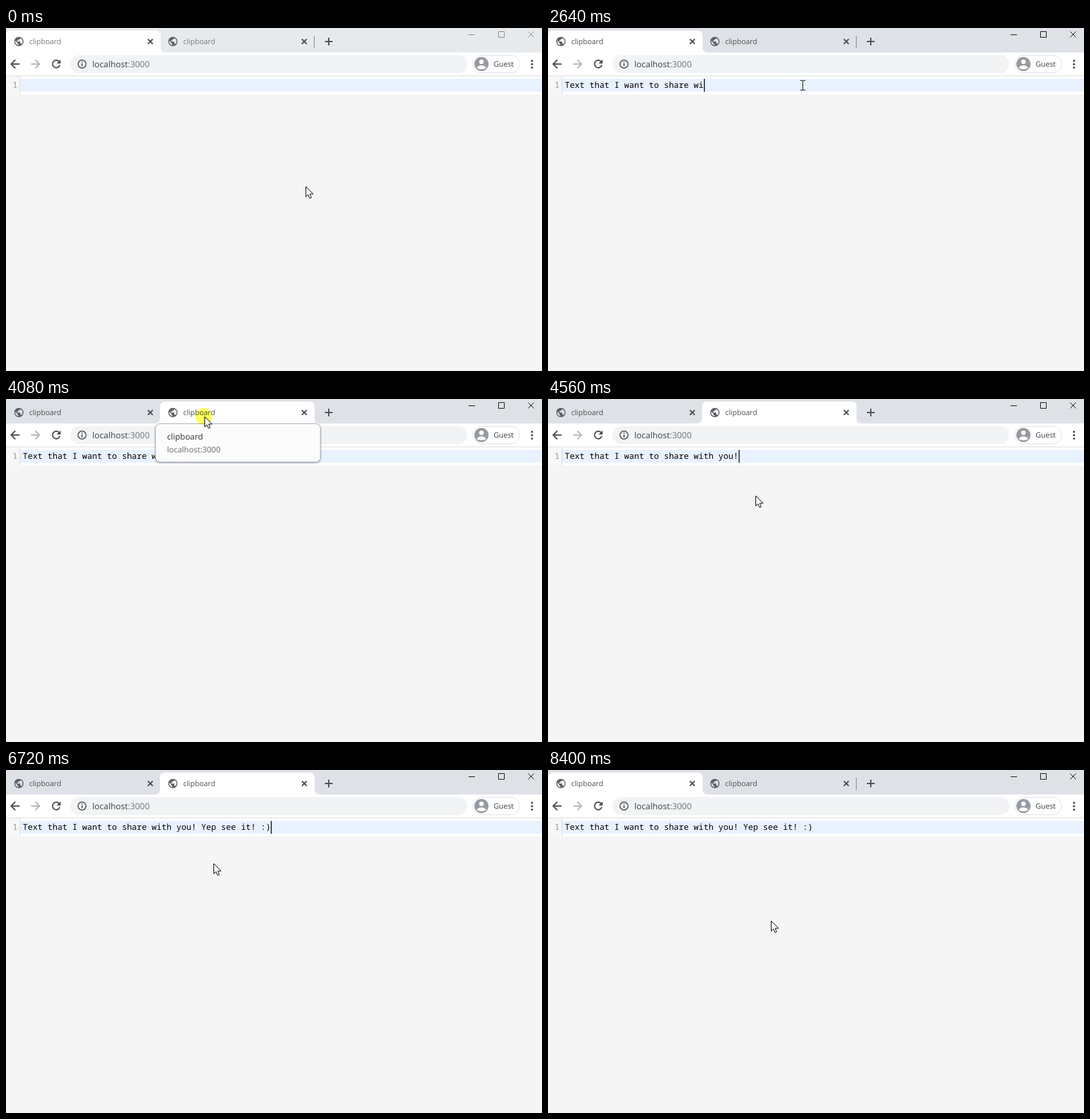
Animation, 832 px wide and 533 px high, one loop 8640 ms. Source, as an HTML page:

```html
<!DOCTYPE html>
<html lang="en">
<head>
<meta charset="utf-8">
<title>clipboard</title>
<style>
  html, body { margin: 0; width: 100%; height: 100%; overflow: hidden; background: #f5f5f5; }
  svg { display: block; width: 832px; height: 533px; }
  text { text-rendering: geometricPrecision; font-family: "Open Sans", "Noto Sans", sans-serif; white-space: pre; }
  .code { font: 12.83px "Noto Sans Mono", "DejaVu Sans Mono", monospace; }
  .title { font-size: 11.4px; fill: #4b4f53; }
  .line { fill: none; stroke: #4c5054; stroke-width: 2; }
  .inactive .title { fill: #777; }
  .inactive #buttons { stroke: #8b8b8b; }
</style>
</head>
<body>
<svg id="stage" viewBox="0 0 832 533">
  <defs>
    <path id="globe" transform="translate(11.4 12.4) scale(.72)" fill="#5f6368" d="M12 2C6.48 2 2 6.48 2 12s4.48 10 10 10 10-4.48 10-10S17.52 2 12 2zm-1 17.93c-3.95-.49-7-3.85-7-7.93 0-.62.08-1.21.21-1.79L9 15v1c0 1.1.9 2 2 2zm6.9-2.54c-.26-.81-1-1.39-1.9-1.39h-1v-3c0-.55-.45-1-1-1H8v-2h2c.55 0 1-.45 1-1V7h2c1.1 0 2-.9 2-2v-.41c2.93 1.19 5 4.06 5 7.41 0 2.08-.8 3.97-2.1 5.39z"/>
    <g id="tab">
      <use href="#globe"/>
      <text class="title" x="36" y="25">clipboard</text>
      <path class="line" stroke-width="1.8" d="M220.2 17.2l7.6 7.6m0-7.6l-7.6 7.6"/>
    </g>
    <filter id="shadow" x="-10%" y="-10%" width="120%" height="130%">
      <feDropShadow dx="0" dy="1" stdDeviation="1" flood-color="#334" flood-opacity=".55"/>
    </filter>
  </defs>

  <rect width="832" height="533" fill="#f5f5f5"/>
  <rect id="strip" width="832" height="38"/>
  <path id="activeTab" fill="#fff" d="M-8 38Q0 38 0 30V12Q0 4 8 4H232Q240 4 240 12V30Q240 38 248 38Z"/>
  <use href="#tab"/>
  <use href="#tab" x="239"/>
  <path id="divider" stroke="#808488" d="M478.5 12V31"/>
  <path class="line" d="M495 21H507M501 15V27"/>
  <path id="buttons" fill="none" stroke="#111" d="M718 10.5H728M764.5 5.5h9v9h-9ZM810.5 5.5l9 9m0-9l-9 9"/>

  <rect y="38" width="832" height="36" fill="#fff"/>
  <path class="line" d="M21 56H8.5M14.5 49.5L8 56L14.5 62.5"/>
  <path class="line" style="stroke:#b5b7ba" d="M39 56H51.5M45.5 49.5L52 56L45.5 62.5"/>
  <path class="line" d="M82.3 52A5.8 5.8 0 1 0 83.6 57.5"/>
  <path fill="#4c5054" d="M84.8 49V55.3H78.5Z"/>
  <rect x="100" y="42" width="616" height="28" rx="14" fill="#f1f3f4"/>
  <circle class="line" cx="118" cy="56" r="6.2" style="stroke-width:1.5"/>
  <path class="line" style="stroke-width:1.6" d="M118 55V59.5M118 52V53.7"/>
  <text x="134" y="61" font-size="13.2" fill="#3c4043">localhost<tspan fill="#70757a">:3000</tspan></text>
  <rect x="724.5" y="42.5" width="73" height="27" rx="13.5" fill="#fff" stroke="#dfe1e5"/>
  <circle cx="738" cy="56" r="11" fill="#969ba1"/>
  <circle cx="738" cy="52.5" r="3.5" fill="#fff"/>
  <path fill="#fff" d="M731 62.5C731 56.7 745 56.7 745 62.5Q738 66 731 62.5Z"/>
  <text x="757" y="60" font-size="11.4" fill="#3c4043">Guest</text>
  <g fill="#4c5054"><circle cx="816.5" cy="51" r="1.7"/><circle cx="816.5" cy="56.3" r="1.7"/><circle cx="816.5" cy="61.6" r="1.7"/></g>

  <rect y="74" width="832" height="1" fill="#dcdee0"/>
  <rect y="75" width="832" height="28" fill="#fff"/>
  <rect y="75" width="21" height="28" fill="#f7f7f7"/>
  <rect x="21" y="75" width="1" height="28" fill="#ddd"/>
  <rect x="22" y="79" width="810" height="20" fill="#e8f2ff"/>
  <text class="code" x="10.3" y="93" fill="#999">1</text>
  <text class="code" id="typed" x="26" y="93" fill="#000"></text>
  <rect id="caret" y="79" width="1.3" height="20"/>

  <g id="card">
    <rect x="232" y="38.5" width="256" height="59.5" rx="7" fill="#fff" fill-opacity=".95" stroke="#98a0a8" stroke-width=".8" filter="url(#shadow)"/>
    <text x="250" y="63" font-size="12.75" fill="#303336">clipboard</text>
    <text x="250" y="83" font-size="12.3" fill="#666a6e">localhost:3000</text>
  </g>

  <circle id="click" r="13" fill="#ffff60" style="mix-blend-mode:multiply"/>
  <g id="pointer">
    <path id="arrow" fill="#fff" stroke="#000" d="M.5 .5V16.3L4 13L6.5 18.6L9 17.6L6.6 12H11.8Z"/>
    <path id="beam" fill="none" stroke="#111" d="M-3.5 -7.5H-1Q.5 -7.5 .5 -6V6.5Q.5 7.5 -1 7.5H-3.5M4.5 -7.5H2Q.5 -7.5 .5 -6M.5 6Q.5 7.5 2 7.5H4.5"/>
  </g>
</svg>
<script>
const LOOP = 8640, STEP = 240, ADVANCE = 7.7;
const MESSAGE = "Text that I want to share with you! Yep see it! :)";

// Each key is [time, value...]; values run linearly between keys.
const typing = [
  [480, 0], [960, 7], [1200, 10], [2400, 24], [2640, 28], [3360, 35],
  [4560, 35], [4800, 36], [5040, 36], [5760, 44], [6240, 47], [6720, 50]
];
const travel = [
  [0, 465, 246], [480, 395, 89], [3360, 395, 89], [3600, 395, 112],
  [4080, 308, 27], [4320, 340, 89], [4560, 322, 150], [4800, 322, 145],
  [6720, 322, 145], [6960, 405, 120], [7440, 26, 108], [7680, 240, 48],
  [7920, 120, 27], [8400, 346, 234]
];
const clicks = [480, 4080, 4320, 7920];

const el = id => document.getElementById(id);
const show = (id, on) => el(id).setAttribute("visibility", on ? "visible" : "hidden");
const between = (v, low, high) => v >= low && v < high;

function sample(keys, t) {
  const next = keys.findIndex(key => key[0] > t);
  if (next === 0) return keys[0].slice(1);
  if (next < 0) return keys[keys.length - 1].slice(1);
  const from = keys[next - 1], to = keys[next];
  const k = (t - from[0]) / (to[0] - from[0]);
  return from.slice(1).map((v, i) => v + (to[i + 1] - v) * k);
}

function render(time) {
  const t = Math.floor(time % LOOP / STEP) * STEP;
  const focused = t >= 480;
  const second = between(t, 4080, 7920);

  el("stage").classList.toggle("inactive", !focused);
  el("strip").setAttribute("fill", focused ? "#dee1e6" : "#e7eaed");
  el("activeTab").setAttribute("transform", `translate(${second ? 239 : 0})`);
  show("divider", !second);
  show("card", t === 4080);

  const count = Math.round(sample(typing, t)[0]);
  el("typed").textContent = MESSAGE.slice(0, count);
  el("caret").setAttribute("x", Math.round(26 + count * ADVANCE));
  show("caret", between(t, 480, 7440) && t !== 4080);

  const [x, y] = sample(travel, t).map(Math.round);
  const overText = between(y, 42, 71) || between(y, 79, 103);
  el("pointer").setAttribute("transform", `translate(${x} ${y})`);
  show("arrow", !overText);
  show("beam", overText);
  el("click").setAttribute("cx", x - 1);
  el("click").setAttribute("cy", y);
  show("click", clicks.includes(t));
}

function tick() {
  render(performance.now());
  requestAnimationFrame(tick);
}
tick();
</script>
</body>
</html>
```
